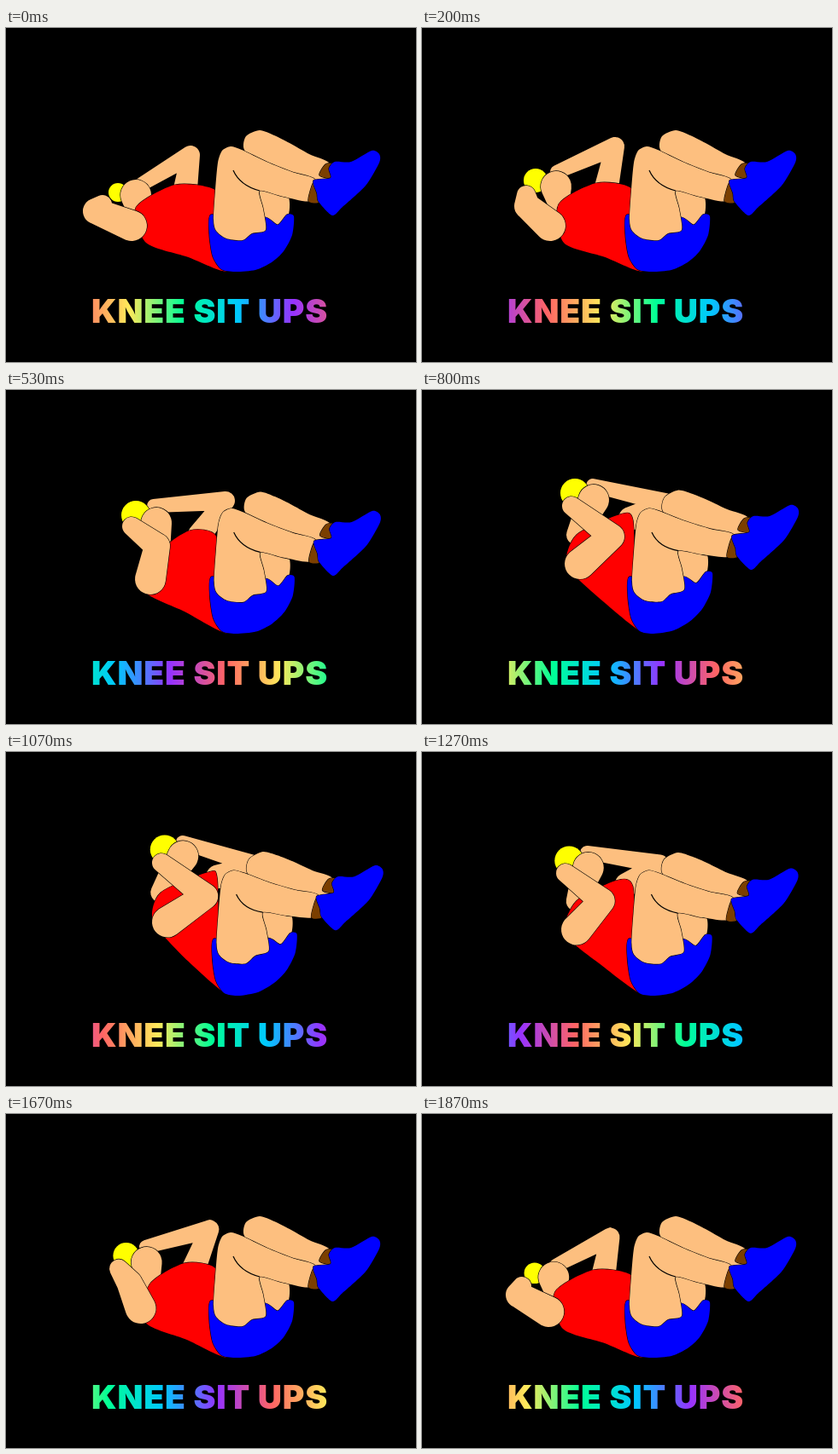
These frames come from a looping animation (480 by 392 pixels, 1.94 s). An HTML page with a canvas:

```html
<!DOCTYPE html>
<html lang="en">
<head>
<meta charset="utf-8">
<title>Knee sit ups</title>
<style>
html, body { margin: 0; width: 100%; height: 100%; overflow: hidden; background: #000; }
canvas { display: block; }
</style>
</head>
<body>
<canvas id="stage" width="480" height="392"></canvas>
<script>
const ctx = document.getElementById('stage').getContext('2d');
const LOOP = 1940, STEPS = 29, FPS = 15, TOP_STEP = 15;
const SKIN = '#fdbf7f', RED = '#f00', BLUE = '#00f', YELLOW = '#ff0', BROWN = '#7b3f00';

const points = s => s.split(' ').map(p => p.split(',').map(Number));
const lerp = (a, b, t) => a + (b - a) * t;
const mix = (a, b, t) => [lerp(a[0], b[0], t), lerp(a[1], b[1], t)];
const clamp = t => Math.max(0, Math.min(1, t));

// Path of each joint: lying, lifting, half way, curled up
const joints = {
  shoulder: points('147,232 150,232 169,222 185,204'),
  elbow: points('105,215 123,209 177,183 222,172'),
  hand: points('113,207 122,196 147,160 175,136'),
  farHand: points('156,185 158,169 173,136 200,112'),
  farElbow: points('216,149 226,139 257,130 285,132'),
  head: points('152,196 157,186 176,156 201,129'),
  hair: points('131,193 133,179 152,147 179,121'),
  neck: points('152,211 160,207 180,190 181,170'),
  chest: points('198,184 204,182 215,165 232,146'),
  back: points('164,252 166,252 160,234 170,206')
};

// Outlines of the lower body at rest
const legs = {
  farShin: points('279,143 281,127 297,120 314,126 332,135 355,148 379,159 374,182 300,165'),
  farThigh: points('286,185 328,194 331,218 318,231 300,222'),
  shorts: points('240,219 270,230 303,222 318,231 329,219 337,221 335,243 325,262 311,275 292,284 268,286 252,283 242,268 238,242'),
  nearLeg: points('243,225 245,190 248,158 253,144 263,139 276,143 305,157 335,169 362,178 357,203 325,198 297,191 301,212 304,237 288,241 277,249 258,247 246,238'),
  farSock: points('367,173 374,160 384,160 384,176'),
  nearSock: points('354,203 360,181 369,184 367,204'),
  shoes: points('360,179 380,176 378,165 385,157 404,157 428,144 437,148 437,158 421,185 394,210 382,220 366,204 364,194')
};

function paint(path, fill) {
  ctx.lineWidth = 1.2;
  ctx.stroke(path);
  ctx.fillStyle = fill;
  ctx.fill(path);
}

// Smooth closed outline
function blob(pts, fill) {
  const n = pts.length, at = i => pts[(i + n) % n];
  const path = new Path2D();
  path.moveTo(...pts[0]);
  for (let i = 0; i < n; i++) {
    const [a, b, c, d] = [at(i - 1), at(i), at(i + 1), at(i + 2)];
    path.bezierCurveTo(
      b[0] + (c[0] - a[0]) / 8, b[1] + (c[1] - a[1]) / 8,
      c[0] - (d[0] - b[0]) / 8, c[1] - (d[1] - b[1]) / 8, c[0], c[1]);
  }
  paint(path, fill);
}

// Chain of tapered, round-ended segments
function limb(pts, radii, fill) {
  const path = new Path2D();
  for (let i = 0; i + 1 < pts.length; i++) {
    const [[x1, y1], [x2, y2]] = [pts[i], pts[i + 1]];
    const [r1, r2] = [radii[i], radii[i + 1]];
    const dir = Math.atan2(y2 - y1, x2 - x1);
    const side = Math.acos((r1 - r2) / Math.hypot(x2 - x1, y2 - y1));
    path.moveTo(x1 + r1 * Math.cos(dir + side), y1 + r1 * Math.sin(dir + side));
    path.arc(x1, y1, r1, dir + side, dir - side + 2 * Math.PI);
    path.arc(x2, y2, r2, dir - side, dir + side);
    path.closePath();
  }
  paint(path, fill);
}

function disc([x, y], r, fill) {
  const path = new Path2D();
  path.arc(x, y, r, 0, 2 * Math.PI);
  paint(path, fill);
}

// Position along the joint paths, d steps away from the top
function curl(d) {
  if (d > 12) return ((15 - d) / 3) ** 2;
  if (d > 7) return 1 + (12 - d) / 5;
  return 2 + Math.min(1.25, (7 - d) / 4);
}

function drawFigure(step) {
  const k = curl(Math.abs(step - TOP_STEP));
  const i = Math.min(Math.floor(k), 2);
  const p = {};
  for (const name in joints) p[name] = mix(joints[name][i], joints[name][i + 1], k - i);

  const raise = Math.max(0, (k - 1.7) / 1.3);
  const lift = ([x, y]) => [x + 3 * raise, y - 9 * raise * clamp((x - 270) / 100)];
  const leg = (name, fill) => blob(legs[name].map(lift), fill);

  const [cx, cy] = p.chest;
  const hip = [260 + raise, 285];
  const waist = mix(p.back, hip, 0.5);
  const torso = [p.back, p.neck, p.chest, [246 + raise, cy + 7],
    [250, 235], hip, [waist[0] - 3 * raise, waist[1] + 3 * raise]];

  ctx.strokeStyle = '#000';
  ctx.lineJoin = 'round';
  limb([p.farHand, p.farElbow, [cx + 12, cy + 5]], [8, 11, 14], SKIN);
  leg('farShin', SKIN);
  disc(p.hair, lerp(11, 17, clamp(k / 2)), YELLOW);
  limb([p.head, p.neck], [18, 12], SKIN);
  blob(torso, RED);
  limb([p.shoulder, p.elbow, p.hand], [18, 15, 11], SKIN);
  leg('farThigh', SKIN);
  leg('shorts', BLUE);
  leg('nearLeg', SKIN);

  ctx.beginPath();
  ctx.moveTo(...lift([266, 167]));
  ctx.quadraticCurveTo(...lift([274, 185]), ...lift([297, 191]));
  ctx.stroke();

  leg('farSock', BROWN);
  leg('nearSock', BROWN);
  leg('shoes', BLUE);
}

function drawTitle(step) {
  const period = 320;
  const x = 80 + (step * 2 * period / STEPS) % period - period;
  const colors = ['#ff6464', '#ffe95a', '#00ff96', '#00c8ff', '#9632ff'];
  const fill = ctx.createLinearGradient(x, 0, x + 2 * period, 0);
  for (let i = 0; i <= 10; i++) fill.addColorStop(i / 10, colors[i % 5]);
  ctx.fillStyle = fill;
  ctx.font = '900 39px Inter, "Open Sans", sans-serif';
  ctx.letterSpacing = '0.85px';
  ctx.fillText('KNEE SIT UPS', 100, 346);
}

const start = performance.now();
function frame() {
  const t = Math.max(0, performance.now() - start) % LOOP;
  const step = Math.min(STEPS - 1, Math.floor((t + 4) * FPS / 1000));
  ctx.fillStyle = '#000';
  ctx.fillRect(0, 0, 480, 392);
  drawFigure(step);
  drawTitle(step);
  requestAnimationFrame(frame);
}
frame();
</script>
</body>
</html>
```
